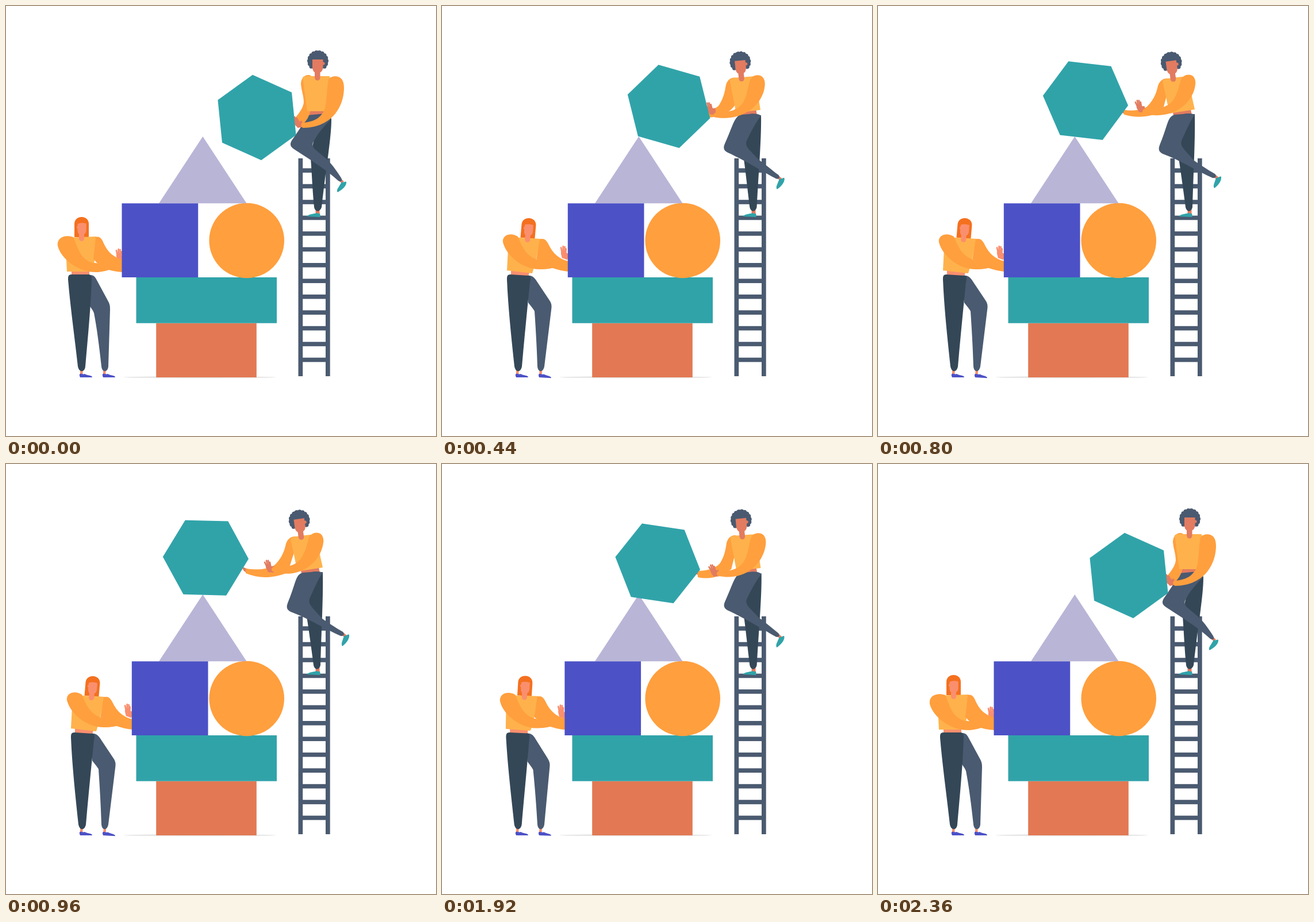
Animation of 748 by 748 pixels, one loop 3.04 s. Source, as an HTML page:

```html
<!DOCTYPE html>
<html lang="en">
<head>
<meta charset="utf-8">
<title>Building blocks</title>
<style>
html, body { margin: 0; width: 100%; height: 100%; overflow: hidden; background: #fff; }
svg { display: block; width: 100%; height: 100%; }
</style>
</head>
<body>
<svg id="stage" viewBox="0 0 748 748"></svg>
<script>
const LOOP = 3040, STEP = 40;
const C = {
  teal: '#30a3a9', blue: '#4c51c6', orange: '#ff9f3e', yellow: '#ffb24c', brick: '#e27954',
  lilac: '#b9b5d7', slate: '#4a5a70', navy: '#344757', ginger: '#f4701f',
  skinA: '#e27b60', skinB: '#fa8f6e'
};

// Timelines: [time, pose index]
const MAN = [[0, 0], [600, 1], [960, 2], [1720, 2], [2360, 0], [LOOP, 0]];
const WOMAN = [[0, 0], [400, 1], [1720, 1], [2360, 0], [LOOP, 0]];
const HEX = [[0, 0], [240, 1], [640, 2], [960, 3], [1720, 3], [2360, 0], [LOOP, 0]];

const stage = document.getElementById('stage');
const moving = [];

function add(tag, attrs, parent = stage) {
  const el = document.createElementNS('http://www.w3.org/2000/svg', tag);
  for (const name in attrs) el.setAttribute(name, attrs[name]);
  parent.appendChild(el);
  return el;
}

// Registers an attribute that blends between poses along a timeline
function pose(el, attr, keys, poses) {
  moving.push({ el, attr, keys, poses });
  return el;
}
const limb = (fill, keys, ...poses) => pose(add('path', { fill }), 'd', keys, poses);
const joint = (keys, ...poses) => pose(add('g', {}), 'transform', keys, poses);
const bone = (stroke, width, keys, ...poses) =>
  pose(add('path', { stroke, 'stroke-width': width, fill: 'none' }), 'd', keys, poses);
const rect = (x, y, width, height, fill) => add('rect', { x, y, width, height, fill });

function mix(a, b, f) {
  const to = b.match(/-?[\d.]+/g);
  let i = 0;
  return a.replace(/-?[\d.]+/g, n => (+n + (to[i++] - n) * f).toFixed(2));
}

function hand(parent, fill) {
  add('path', { fill, d: 'M3 3 L-7 2 C-9 -3 -12 -5 -11 -10 C-8 -13 -4 -13 -2 -9 C0 -7 2 -9 3 -8 C4 -4 3 0 3 3 Z' }, parent);
  add('path', {
    fill: 'none', stroke: fill, 'stroke-width': 2.7, 'stroke-linecap': 'round',
    d: 'M-10 -9 L-13 -15 M-8 -10 L-10 -18 M-5 -10 L-7 -18 M-3 -9 L-4 -15'
  }, parent);
}

function buildLadder() {
  rect(508.5, 265, 7.7, 379, C.slate);
  rect(556, 265, 7.7, 379, C.slate);
  for (let i = 0; i < 13; i++) rect(512, 282.3 + i * 27.45, 48, 7.6, C.slate);
}

function buildMan() {
  // Standing leg and shoe
  rect(538.5, 350, 7, 12, C.skinA);
  add('path', { fill: C.teal, d: 'M523 366 C528 361 536 362 540 360 Q544 362 546 360.5 L547 366 Q546 367.5 543 367 Z' });
  limb(C.navy, MAN,
    'M545 188 L566 196 C566 230 558 270 549 350 C546 359 538 359 536 350 C533 320 532 290 530 265 C533 240 540 215 545 188 Z',
    'M530 188 L551 188 C552 230 549 280 547 350 C545 359 537 359 535 350 C531 320 527 290 523 265 C520 240 522 215 530 188 Z');

  // Raised leg and shoe
  bone(C.skinA, 5, MAN, 'M580 301 L586 307', 'M585 295 L591 300');
  limb(C.teal, MAN,
    'M584 306 C588 308 590 304 592 306 C593 313 584 320 577 324 C575 322 576 319 578 316 Z',
    'M588 299 C592 300 594 295 597 297 C598 304 592 312 585 317 C583 314 584 311 585 308 Z');
  limb(C.skinA, MAN, 'M529 182 L553 182 L553 190 L527 190 Z', 'M513 185 L544 180 L546 189 L514 191 Z');
  limb(C.slate, MAN,
    'M524 190 C518 205 507 219 497 234 C493 241 495 245 501 249 C530 268 556 284 578 304 C583 307 586 304 583 299 C574 285 565 272 555 264 L537 249 C533 244 532 240 536 234 C545 217 557 206 566 196 C560 188 552 187 545 188 Z',
    'M516 189 C503 193 505 206 490 242 C487 250 489 254 495 257 C525 268 555 287 582 299 C587 300 590 296 586 292 C572 284 562 277 550 269 L533 250 C527 243 526 238 529 232 C536 217 543 200 551 189 C545 186 535 187 530 188 Z');

  // Far arm
  const far = joint(MAN, 'translate(505 198)', 'translate(441 182)', 'translate(418 184)');
  add('path', { fill: C.skinA, d: 'M2 -2 C-2 -2 -4 -5 -7 -5 L-6 -1 C-4 3 -1 4 2 5 Z' }, far);
  limb(C.orange, MAN,
    'M528 120 C518 119 513 127 513 136 C514 148 518 156 518 168 C516 180 508 188 503 195 L507 212 C522 205 530 190 532 170 L534 124 Z',
    'M503 126 C494 126 488 132 486 143 C483 155 477 166 468 175 C460 179 450 181 441 179 L441 187 C465 191 490 186 502 172 L510 126 Z',
    'M503 126 C494 126 488 132 486 143 C483 155 477 167 467 176 C455 183 440 185 417 182 L417 190 C440 200 465 199 490 189 L510 126 Z');

  limb(C.yellow, MAN,
    'M516 124 Q520 121 535 122 L563 122 L562 183 L524 183 Z',
    'M495 130 Q499 126 512 125 L538 122 L551 180 L507 187 Z');

  buildManHead();

  // Near arm
  hand(joint(MAN, 'translate(514 208) rotate(-18)', 'translate(458 178) rotate(0)', 'translate(463 186) rotate(0)'), C.skinA);
  limb(C.orange, MAN,
    'M562 126 C567 121 588 117 588 142 C588 172 570 211 517 212 C513 211 512 206 515 203 C538 202 553 192 556 172 C559 155 558 135 562 126 Z',
    'M527 128 C533 115 555 116 552 137 C548 170 510 198 460 187 C456 186 457 180 461 179 C485 180 505 176 514 163 C522 150 523 140 527 128 Z',
    'M527 128 C533 115 555 116 552 137 C548 170 512 202 464 187 C461 186 461 181 465 179 C487 181 505 177 514 163 C522 150 523 140 527 128 Z');
}

function buildManHead() {
  const head = joint(MAN, 'translate(542.5 95.5) rotate(0)', 'translate(510.2 98) rotate(-8)');
  add('circle', { r: 15, fill: C.slate }, head);
  for (let i = 0; i < 14; i++) {
    const a = (140 + i * 20) * Math.PI / 180;
    add('circle', { cx: 14.6 * Math.cos(a), cy: 14.6 * Math.sin(a), r: 3.9, fill: C.slate }, head);
  }
  add('path', { fill: C.skinA, d: 'M-9.5 -2.5 H9 V11 Q8.5 18 4 20 V29 Q3.5 34 -.5 34 Q-5 34 -5.5 29 V20 Q-9.5 17 -9.5 11 Z' }, head);
  add('circle', { cx: 9.5, cy: 4.5, r: 2.6, fill: C.skinA }, head);
}

function buildWoman() {
  // Shoes and ankles
  const shoe = 'M0 -5 C2 -7.5 5 -4 9 -5.5 C14 -2.5 22 -3.5 22 0.5 H1 Q-1 -2 0 -5 Z';
  const ankle = { x: 1, y: -14, width: 4.5, height: 9.5, fill: C.skinB };
  const left = add('g', { transform: 'translate(128 645.5)' });
  const right = joint(WOMAN, 'translate(168 645.5) rotate(0)', 'translate(168 645.5) rotate(3)');
  for (const foot of [left, right]) {
    add('rect', ankle, foot);
    add('path', { d: shoe, fill: C.blue }, foot);
  }

  limb(C.skinB, WOMAN, 'M114 460 L145 460 L145 469 L114 469 Z', 'M120 459 L152 463 L150 471 L120 469 Z');
  limb(C.slate, WOMAN,
    'M143 468 C152 467 155 471 158 477 L178 514 C181 520 181 523 181 528 L178 627 C177 638 167 638 166 627 C162 590 158 560 153 534 C151 528 147 525 145 520 Z',
    'M148 469 C157 468 161 473 165 479 L187 512 C191 518 191 522 190 529 L178 627 C176 638 167 638 166 627 C165 595 163 560 161 531 C159 527 153 520 150 516 Z');
  limb(C.navy, WOMAN,
    'M114 467 C108 467 108 471 108 476 C112 525 120 580 125 627 C127 638 137 638 138 627 C142 580 148 520 149 474 C149 469 147 467 143 467 Z',
    'M119 467 C113 467 113 471 113 476 C115 525 121 580 126 627 C128 638 137 638 139 627 C143 580 148 530 153 480 C155 473 154 469 150 469 Z');

  const headPoses = ['translate(131.5 384) rotate(0)', 'translate(150.5 386) rotate(5)'];
  const hair = joint(WOMAN, ...headPoses);
  add('path', { fill: C.ginger, d: 'M-12.5 18 V-5 C-12.5 -21 12.5 -21 12.5 -5 V18 Z' }, hair);
  limb(C.yellow, WOMAN,
    'M103 403 L157 401 L153 455 L146 462 L106 462 Z',
    'M116 402 L172 405 L160 455 L157 465 L113 460 Z');
  const face = joint(WOMAN, ...headPoses);
  add('path', { fill: C.skinB, d: 'M-7 -5 Q0 -8 8 -5.5 V6 Q8 11 4.5 13 V21 Q4 25 0 25 Q-4 25 -4.5 21 V13 Q-7 11 -7 6 Z' }, face);
  add('circle', { cx: -6.5, cy: 1, r: 2.2, fill: C.skinB }, face);

  hand(joint(WOMAN, 'translate(201 443) rotate(14)', 'translate(216 438) rotate(14)'), C.skinB);
  limb(C.orange, WOMAN,
    'M156 402 C163 400 167 405 170 413 C177 428 187 437 202 441 L203 463 C180 462 164 455 152 440 C154 425 155 412 156 402 Z',
    'M170 406 C178 403 182 408 186 416 C193 430 203 440 220 444 L220 462 C200 460 180 453 164 440 C167 427 168 416 170 406 Z');
  limb(C.orange, WOMAN,
    'M117 402 C104 397 88 402 90 417 C95 440 128 465 160 463 C170 462 178 460 184 457 C192 455 197 445 197 442 C180 447 160 449 148 446 C128 438 125 420 117 402 Z',
    'M132 401 C120 393 104 398 106 411 C111 432 138 458 170 458 C185 458 193 456 199 453 C206 450 210 445 212 442 C196 445 180 444 165 441 C146 434 140 420 132 401 Z');
}

function buildBlocks() {
  add('ellipse', { cx: 337, cy: 645.7, rx: 132, ry: 1.8, fill: '#e6e6e6' });
  rect(261.2, 551.7, 174.6, 94.3, C.brick);
  rect(226.5, 472, 244.5, 79.7, C.teal);
  add('circle', { cx: 418.7, cy: 408, r: 65.3, fill: C.orange });
  add('path', { fill: C.lilac, d: 'M342.3 227 L418.5 343.3 H266 Z' });
  const square = joint(WOMAN, 'translate(201.5 343.3)', 'translate(218.8 343.3)');
  add('rect', { width: 132.7, height: 128.7, fill: C.blue }, square);

  const hex = joint(HEX,
    'translate(436.5 194) rotate(-5.8)', 'translate(414.6 183.2) rotate(-9.7)',
    'translate(374.6 166) rotate(-18.3)', 'translate(347.4 163.2) rotate(-28.6)');
  const corners = [];
  for (let i = 0; i < 6; i++) {
    const a = i * Math.PI / 3;
    corners.push([74.6 * Math.sin(a), -74.6 * Math.cos(a)]);
  }
  add('polygon', { points: corners.join(' '), fill: C.teal }, hex);
}

function draw(t) {
  for (const { el, attr, keys, poses } of moving) {
    const i = keys.findIndex(k => k[0] > t);
    const [t0, from] = keys[i - 1], [t1, to] = keys[i];
    const at = n => poses[Math.min(n, poses.length - 1)];
    el.setAttribute(attr, mix(at(from), at(to), (t - t0) / (t1 - t0)));
  }
}

buildLadder();
buildMan();
buildWoman();
buildBlocks();

const start = performance.now();
function tick() {
  const t = (performance.now() - start) % LOOP;
  draw(Math.floor(t / STEP) * STEP);
  requestAnimationFrame(tick);
}
tick();
</script>
</body>
</html>
```
